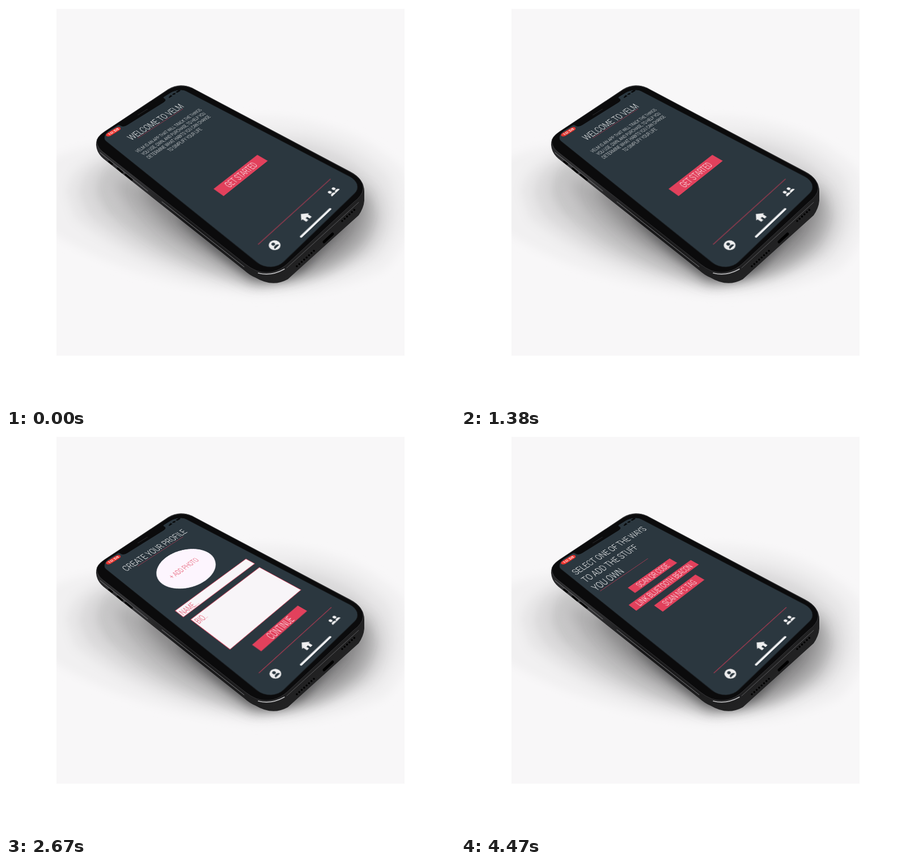
An HTML page for the animation above (4500 ms loop, 792 by 707 pixels).

```html
<!DOCTYPE html>
<html lang="en">
<head>
<meta charset="utf-8">
<title>App walkthrough</title>
<style>
  html, body { margin: 0; width: 100%; height: 100%; overflow: hidden; background: #fff; }
  svg { position: absolute; left: 0; top: 0; overflow: visible; }
  /* The display plane: each column is a vanishing point times a scale. */
  #display {
    transform-origin: 0 0;
    transform: matrix3d(.75743, -.32004, 0, .0004445, .284, .15975, 0, -.00071, 0, 0, 1, 0, 273, 207, 0, 1);
  }
  text { font-family: Roboto, "Open Sans", sans-serif; font-weight: 300; }
</style>
</head>
<body>
<svg width="792" height="707" viewBox="0 0 792 707">
  <defs>
    <filter id="soft" x="-30%" y="-30%" width="160%" height="160%"><feGaussianBlur stdDeviation="8"/></filter>
    <filter id="softer" x="-40%" y="-40%" width="180%" height="180%"><feGaussianBlur stdDeviation="12"/></filter>
    <linearGradient id="steel" x1="0" y1="0" x2="1" y2=".8">
      <stop offset="0" stop-color="#1b1b1c"/><stop offset=".3" stop-color="#333335"/>
      <stop offset=".55" stop-color="#171718"/><stop offset="1" stop-color="#242425"/>
    </linearGradient>
    <clipPath id="card"><rect x="89" y="5" width="614" height="613"/></clipPath>
  </defs>
  <g clip-path="url(#card)">
    <rect x="89" y="5" width="614" height="613" fill="#f8f7f8"/>
    <g filter="url(#soft)">
      <path fill="#f1f0f1" d="M70 275Q120 250 170 245L440 195Q610 195 700 290Q740 390 670 465Q560 520 430 512Q220 490 70 395Z"/>
      <path fill="#e7e6e7" d="M105 330Q110 285 165 262L470 222Q600 220 675 300Q715 390 650 450Q550 505 430 503Q240 475 120 375Z"/>
      <path fill="#dad9da" d="M130 335Q130 290 180 270L520 242Q620 260 665 330Q690 395 635 442Q550 497 440 498Q250 462 145 368Z"/>
      <path fill="#c8c7c8" d="M160 335Q155 300 185 280L600 290Q650 320 655 375Q630 435 555 473Q495 495 435 493Q270 452 175 362Z"/>
    </g>
    <path filter="url(#softer)" fill="#aeadae" d="M192 305Q210 375 300 422Q390 468 440 488Q560 482 628 425Q665 380 632 325Z"/>
    <path filter="url(#softer)" fill="#878687" d="M235 322Q275 388 350 430L445 484Q540 474 600 420Q636 380 628 340Z"/>
    <path filter="url(#soft)" fill="#5f5f60" d="M300 370Q350 425 430 478Q490 492 530 462L600 385Z"/>
  </g>
  <path fill="url(#steel)" d="M159 246Q158 233 174 222L286 147Q306 135 328 144.5L607 292.5Q633 306 632 330V344Q631 357 622 370L497 483Q470 498 440 480Q430 476 420 467L172 270Q160 260 159 246Z"/>
  <path fill="#0b0b0c" stroke="#3c3c3e" stroke-width=".8" d="M160 241Q159 232 174 222L286 148Q306 136 328 145L606 293Q631 306 630 323Q629 335 613 347L497 455Q472 478 442 468Q432 464 422 456L171 258Q162 251 160 241Z"/>
  <g fill="none" stroke-linecap="round">
    <path stroke="#77777a" stroke-width="1" d="M166 259L250 327M275 346L420 461"/>
    <path stroke="#050505" stroke-width="3.5" d="M182 275L187 279M197 287L205 294M211 298L222 307"/>
    <path stroke="#b9b9bb" stroke-width="1.6" d="M445 472Q468 478 491 465"/>
    <path stroke="#5a5a5c" stroke-width="1" d="M495 463L622 347"/>
    <path stroke="#000" stroke-width="3.6" stroke-dasharray="0 5.8" d="M513 460L544 432M593 380L617 358"/>
    <path stroke="#000" stroke-width="5" d="M561 417L576 403"/>
  </g>
</svg>
<svg id="display" width="1" height="1"><g id="app" transform="scale(.6)"></g></svg>
<script>
  const RED = '#e2415c', NAVY = '#2b373f', PALE = '#f8f5f8';
  const LOOP = 4500, PROFILE_AT = 1400, SELECT_AT = 3770;

  // Narrow light capitals, one width for all text.
  const label = (str, x, y, size, fill = '#fff', anchor = 'middle') =>
    `<text transform="translate(${x} ${y}) scale(.55 1)" font-size="${size}" fill="${fill}" text-anchor="${anchor}">${str}</text>`;
  const box = (x1, y1, x2, y2, fill, extra = '') =>
    `<rect x="${x1}" y="${y1}" width="${x2 - x1}" height="${y2 - y1}" fill="${fill}" ${extra}/>`;
  const rule = (x1, x2, y) => box(x1, y - 1, x2, y + 1.2, '#a83a50');
  const button = (str, x1, y1, x2, y2, size = 35) =>
    box(x1, y1, x2, y2, RED) + label(str, (x1 + x2) / 2, (y1 + y2) / 2 + size * .35, size);
  const field = (str, x1, y1, x2, y2, base) =>
    box(x1, y1, x2, y2, PALE, `stroke="${RED}" stroke-width="1.5"`) + label(str, x1 + 4, base, 34, RED, 'start');
  const person = (x, y, k) =>
    `<g transform="translate(${x} ${y}) scale(${k})"><circle cy="-5" r="5"/><path d="M-9 9Q-9 2 0 2Q9 2 9 9Z"/></g>`;

  const frame = box(-187.5, -125, 187.5, 694, NAVY, 'rx="44"')
    + '<path fill="#0b0b0c" d="M-112-127H112Q104-125 104-116Q104-96 84-96H-84Q-104-96-104-116Q-104-125-112-127Z"/>'
    + box(-26, -116, 22, -112, '#242426', 'rx="2"')
    + box(-171, -118, -111, -94, '#f0352f', 'id="pill" rx="12"')
    + '<text x="-141" y="-100" font-size="18" style="font-weight:500" fill="#fff" text-anchor="middle">10:58</text>'
    + '<g fill="#08090a"><path d="M118-101V-106L134-113V-101Z"/><path d="M139-108Q147-116 155-108L147-100Z"/></g>'
    + box(159, -112, 177, -102, '#08090a', 'rx="3"')
    + box(-62, 676, 62, 681.5, '#f4f4f6', 'rx="2.7"');

  const tabs = `<g id="tabs">${rule(-148, 148, 615)}<g fill="#eeeeef">
    <circle cx="-122" cy="647" r="14.5"/><g fill="${NAVY}">${person(-122, 647, .9)}</g>
    <path transform="translate(-3 647)" d="M0-14L16 0H11V12H3V4H-3V12H-11V0H-16Z"/>
    ${person(106, 648, .95)}${person(123, 648, .95)}</g></g>`;

  const intro = ['VELM IS AN APP THAT WILL TRACK THE THINGS', 'YOU USE, OWN, AND PURCHASE, TO HELP YOU',
    'DETERMINE WHAT HABITS YOU CAN CHANGE', 'TO SIMPLIFY YOUR LIFE'];
  const prompt = ['SELECT ONE OF THE WAYS', 'TO ADD THE STUFF', 'YOU OWN'];

  const screens = [
    label('WELCOME TO VELM', -4, -6, 49) + rule(-104, 106, 0)
      + intro.map((line, i) => label(line, -3, 66 + i * 28.7, 24.5)).join('')
      + button('GET STARTED', -93, 387, 93, 430),

    label('CREATE YOUR PROFILE', -6, -8, 49) + rule(-104, 106, 0)
      + '<circle cx="-2" cy="147" r="102" fill="#fdf5fe"/>' + label('+ ADD PHOTO', -7, 155, 35, RED)
      + field('NAME...', -152, 277, 155, 317, 312) + field('BIO..', -144, 342, 151, 509, 375)
      + button('CONTINUE', -94, 543, 95, 576),

    prompt.map((line, i) => label(line, -170, -7 + i * 63, 49, undefined, 'start')).join('')
      + rule(-162, 45, 129)
      + button('SCAN QR CODE', -93, 190, 92, 228)
      + button('LINK BLUETOOTH BEACON', -140, 254, 130, 292)
      + button('SCAN NFC TAG', -90, 318, 88, 358)
  ];

  const app = document.getElementById('app');
  app.innerHTML = frame + screens.map(s => `<g class="screen">${s}</g>`).join('') + tabs;
  const layers = app.querySelectorAll('.screen');
  const tabBar = document.getElementById('tabs');
  const pill = document.getElementById('pill');

  function draw() {
    const t = performance.now() % LOOP;
    const current = t < PROFILE_AT ? 0 : t < SELECT_AT ? 1 : 2;
    layers.forEach((layer, i) => layer.setAttribute('visibility', i === current ? 'visible' : 'hidden'));
    tabBar.setAttribute('transform', `translate(0 ${current ? 2.5 : 0})`);
    pill.setAttribute('fill-opacity', .95 + .05 * Math.cos(t / LOOP * 4 * Math.PI));
    requestAnimationFrame(draw);
  }
  draw();
</script>
</body>
</html>
```
